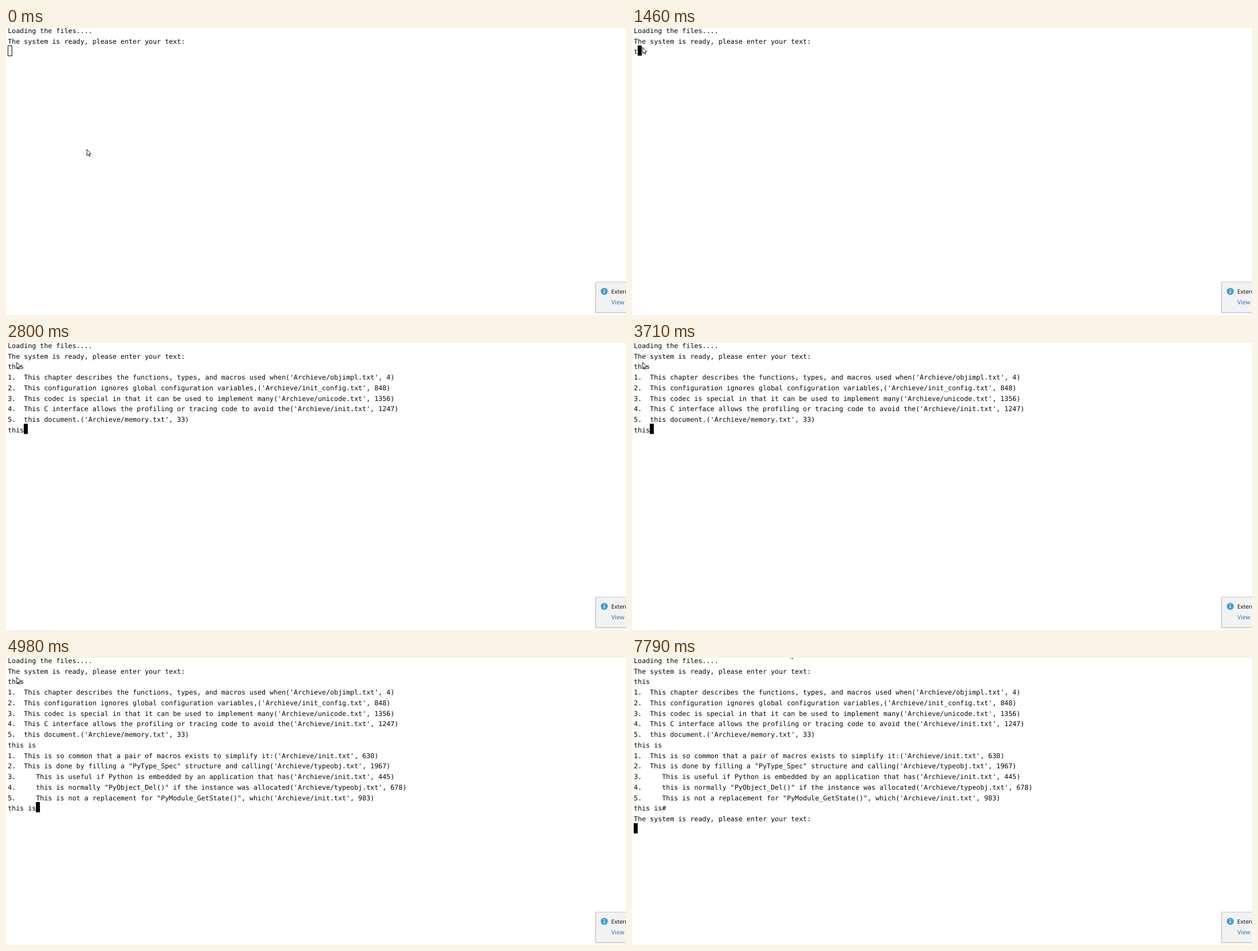
An HTML page that plays this animation: 1099x510 px, repeating every 8 s.

```html
<!DOCTYPE html>
<html lang="en">
<head>
<meta charset="utf-8">
<title>Console search</title>
<style>
  html, body { margin: 0; width: 100%; height: 100%; overflow: hidden; background: #fff; }
  svg { display: block; width: 100vw; height: 100vh; }
  text { white-space: pre; text-rendering: geometricPrecision; }
  #console { font: 11.86px "DejaVu Sans Mono", monospace; fill: #080808; }
  #notice text { font: 10.2px "Open Sans", "Noto Sans", sans-serif; }
</style>
</head>
<body>
<svg viewBox="0 0 1099 510" xml:space="preserve">
  <rect width="1099" height="510" fill="#fff"/>
  <g id="console"></g>
  <rect id="caret" stroke="#000"/>
  <g id="notice">
    <rect x="1043" y="451" width="70" height="57" rx="2" fill="#000" opacity=".04"/>
    <rect x="1044" y="452" width="70" height="55" rx="1" fill="#000" opacity=".06"/>
    <rect x="1045.5" y="451.5" width="70" height="54" fill="#f2f2f2" stroke="#c6c6c6"/>
    <circle cx="1060.5" cy="468" r="6.2" fill="#389fd6"/>
    <path d="M1060.5 464v1.7M1060.5 467v4.6" stroke="#fff" stroke-width="1.6"/>
    <text x="1072.8" y="472" fill="#000" style="font-weight:500">External</text>
    <text x="1073" y="490.8" fill="#2470b3" style="font-size:10.6px">View</text>
  </g>
  <path id="pointer" d="M0.5 0.5V16L4 12.7L6.3 18L8.6 17L6.4 11.8H11.4Z"
        fill="#fff" stroke="#000" stroke-width="1.3"/>
</svg>
<script>
const LOOP = 8000, CELL = 7.14, LINE = 18.75, LEFT = 3;
const PROMPT = "The system is ready, please enter your text:\n";

// Text appended to the console at each time
const output = [
  [0, "Loading the files....\n" + PROMPT],
  [1460, "t"], [1630, "h"], [2090, "i"], [2410, "s"],
  [2800, `
1.  This chapter describes the functions, types, and macros used when('Archieve/objimpl.txt', 4)
2.  This configuration ignores global configuration variables,('Archieve/init_config.txt', 848)
3.  This codec is special in that it can be used to implement many('Archieve/unicode.txt', 1356)
4.  This C interface allows the profiling or tracing code to avoid the('Archieve/init.txt', 1247)
5.  this document.('Archieve/memory.txt', 33)
this`],
  [4030, " "], [4200, "i"], [4830, "s"],
  [4980, `
1.  This is so common that a pair of macros exists to simplify it:('Archieve/init.txt', 630)
2.  This is done by filling a "PyType_Spec" structure and calling('Archieve/typeobj.txt', 1967)
3.     This is useful if Python is embedded by an application that has('Archieve/init.txt', 445)
4.     this is normally "PyObject_Del()" if the instance was allocated('Archieve/typeobj.txt', 678)
5.     This is not a replacement for "PyModule_GetState()", which('Archieve/init.txt', 983)
this is`],
  [7410, "#"],
  [7790, "\n" + PROMPT]
];
const caretOff = [[3250, 3710], [4750, 4830], [5990, 6470], [6930, 7410]];
const MOVE_START = 70, MOVE_END = 680, MOVE_STEPS = 9;

const byId = id => document.getElementById(id);
const caret = byId("caret"), pointer = byId("pointer");

const rows = Array.from({ length: 17 }, (_, i) => {
  const row = document.createElementNS("http://www.w3.org/2000/svg", "text");
  row.setAttribute("x", LEFT + 0.2);
  row.setAttribute("y", 8.9 + i * LINE);
  return byId("console").appendChild(row);
});

function setAttrs(el, attrs) {
  for (const name in attrs) el.setAttribute(name, attrs[name]);
}

function drawCaret(t, row, col) {
  const focused = t >= MOVE_END;
  const inset = focused ? 0 : 0.5;
  setAttrs(caret, {
    x: LEFT + col * CELL + inset,
    y: 31 + (row - 2) * LINE + inset,
    width: focused ? CELL : 7,
    height: focused ? 18.2 : 18,
    fill: focused ? "#000" : "none",
    "stroke-width": focused ? 0 : 1,
    visibility: caretOff.some(([from, to]) => t >= from && t < to) ? "hidden" : "visible"
  });
}

function pointerAt(t) {
  if (t >= 5990) return [279, -11];
  if (t >= 5920) return [279, -4];
  if (t >= 5610) return [40, -30];
  if (t >= 5530) return [32, 14];
  const gap = (MOVE_END - MOVE_START) / (MOVE_STEPS - 1);
  const step = t < MOVE_START ? 0 : Math.min(MOVE_STEPS, Math.floor((t - MOVE_START) / gap) + 1);
  const p = step / MOVE_STEPS;
  const e = p * p * (3 - 2 * p);
  // Rises slightly too far before settling
  return [143 - 124.5 * e, 215.5 - 181.5 * e - 440 * e ** 4 * (1 - e)];
}

function draw(t) {
  const lines = output.filter(([at]) => at <= t).map(([, s]) => s).join("").split("\n");
  rows.forEach((row, i) => {
    const s = lines[i] || "";
    if (row.textContent !== s) row.textContent = s;
  });
  drawCaret(t, lines.length - 1, lines[lines.length - 1].length);
  pointer.setAttribute("transform", `translate(${pointerAt(t)}) scale(.7)`);
}

const start = performance.now();
function tick() {
  draw((performance.now() - start) % LOOP);
  requestAnimationFrame(tick);
}
tick();
</script>
</body>
</html>
```
